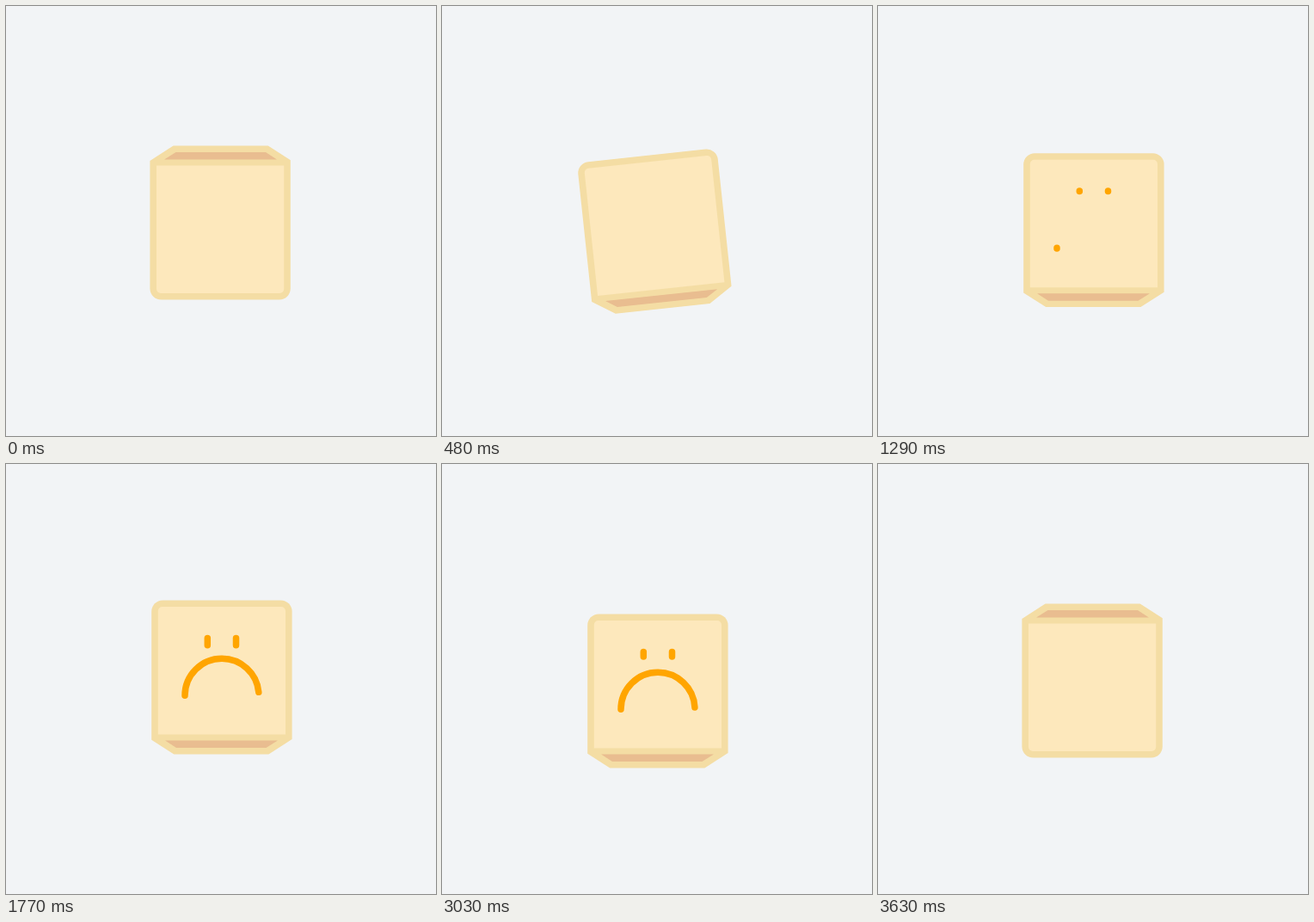
An HTML page for the animation above (4530 ms loop, 500 by 500 pixels).

```html
<!DOCTYPE html>
<html lang="en">
<head>
<meta charset="utf-8">
<title>Sad empty box</title>
<style>
  html, body { margin: 0; width: 100%; height: 100%; overflow: hidden; background: #f2f4f6; }
  svg { display: block; width: 100vw; height: 100vh; }
  .face { fill: none; stroke: #ffa500; stroke-width: 7.5; stroke-linecap: round; }
</style>
</head>
<body>
<svg viewBox="0 0 500 500">
  <g id="box">
    <path fill="#f4dda4" d="M167.4 180 194.5 162.6H304.8L330.8 179.2V328.5a13 13 0 0 1-13 13H180.4a13 13 0 0 1-13-13Z"/>
    <path fill="#e9bd90" d="M184 178.4 197.5 170H302L315 178.4Z"/>
    <path fill="#fde8bc" d="M175 185.4H323.2V329a5 5 0 0 1-5 5H180a5 5 0 0 1-5-5Z"/>
    <g id="face" class="face">
      <path class="eye" pathLength="1" d="M234.3 202.4v8.4"/>
      <path class="eye" pathLength="1" d="M267.5 202.4v8.4"/>
      <path id="mouth" pathLength="1" d="M208 269.3a43 43 0 0 1 86 0"/>
    </g>
  </g>
</svg>
<script>
const LOOP = 4530, STEP = 30;
const box = document.getElementById('box');
const face = document.getElementById('face');
const mouth = document.getElementById('mouth');
const eyes = document.querySelectorAll('.eye');

// [time, offset] keys
const xKeys = [[0, 0], [250, -39], [380, -8], [480, -3], [550, 0],
  [3180, 0], [3300, -9], [3390, -10], [3460, -6], [3630, 0]];
const yKeys = [[0, 0], [250, -24], [380, 14], [480, 15], [550, 17], [700, 3],
  [870, 12], [980, 17], [1130, 17], [1650, -2], [1770, 0], [2160, 8.5],
  [2460, 13], [2700, 16], [3240, 16], [3390, 16], [3450, 22], [3630, 0]];

// Cubic ease in and out between two times
function ease(t, start, end) {
  const u = Math.min(1, Math.max(0, (t - start) / (end - start)));
  return u < .5 ? 4 * u ** 3 : 1 - 4 * (1 - u) ** 3;
}

// Smooth curve through the keys that never overshoots them
function track(keys, t) {
  const i = keys.findIndex(k => k[0] > t);
  if (i < 0) return keys[keys.length - 1][1];
  const slope = n => n < 1 || n >= keys.length ? 0 :
    (keys[n][1] - keys[n - 1][1]) / (keys[n][0] - keys[n - 1][0]);
  const tangent = n => {
    const a = slope(n), b = slope(n + 1);
    return a * b > 0 ? 2 * a * b / (a + b) : 0;
  };
  const [t0, v0] = keys[i - 1], [t1, v1] = keys[i];
  const d = t1 - t0, u = (t - t0) / d, w = 1 - u;
  return v0 * w * w * (1 + 2 * u) + v1 * u * u * (3 - 2 * u) +
    d * u * w * (tangent(i - 1) * w - tangent(i) * u);
}

function drawStroke(path, amount) {
  path.style.visibility = amount > .002 ? 'visible' : 'hidden';
  path.style.strokeDasharray = `${amount} 2`;
}

function render(t) {
  const turn = t < 3630 ? 180 * (ease(t, 70, 585) - ease(t, 3167, 3652)) : 0;
  box.setAttribute('transform',
    `translate(${track(xKeys, t)} ${track(yKeys, t)}) rotate(${turn} 250 250)`);

  const slide = ease(t, 3160, 3390);
  face.setAttribute('transform', `rotate(180 250 250) translate(${6 * slide} ${15.5 * slide})`);
  face.style.opacity = 1 - .2 * slide;
  drawStroke(mouth, ease(t, 1207, 1907) - ease(t, 2950, 3435));
  eyes.forEach(eye => drawStroke(eye, ease(t, 1200, 1600) - ease(t, 2900, 3200)));
}

const begin = performance.now();
function tick() {
  const t = (performance.now() - begin) % LOOP;
  render(Math.floor(t / STEP) * STEP);
  requestAnimationFrame(tick);
}
tick();
</script>
</body>
</html>
```
